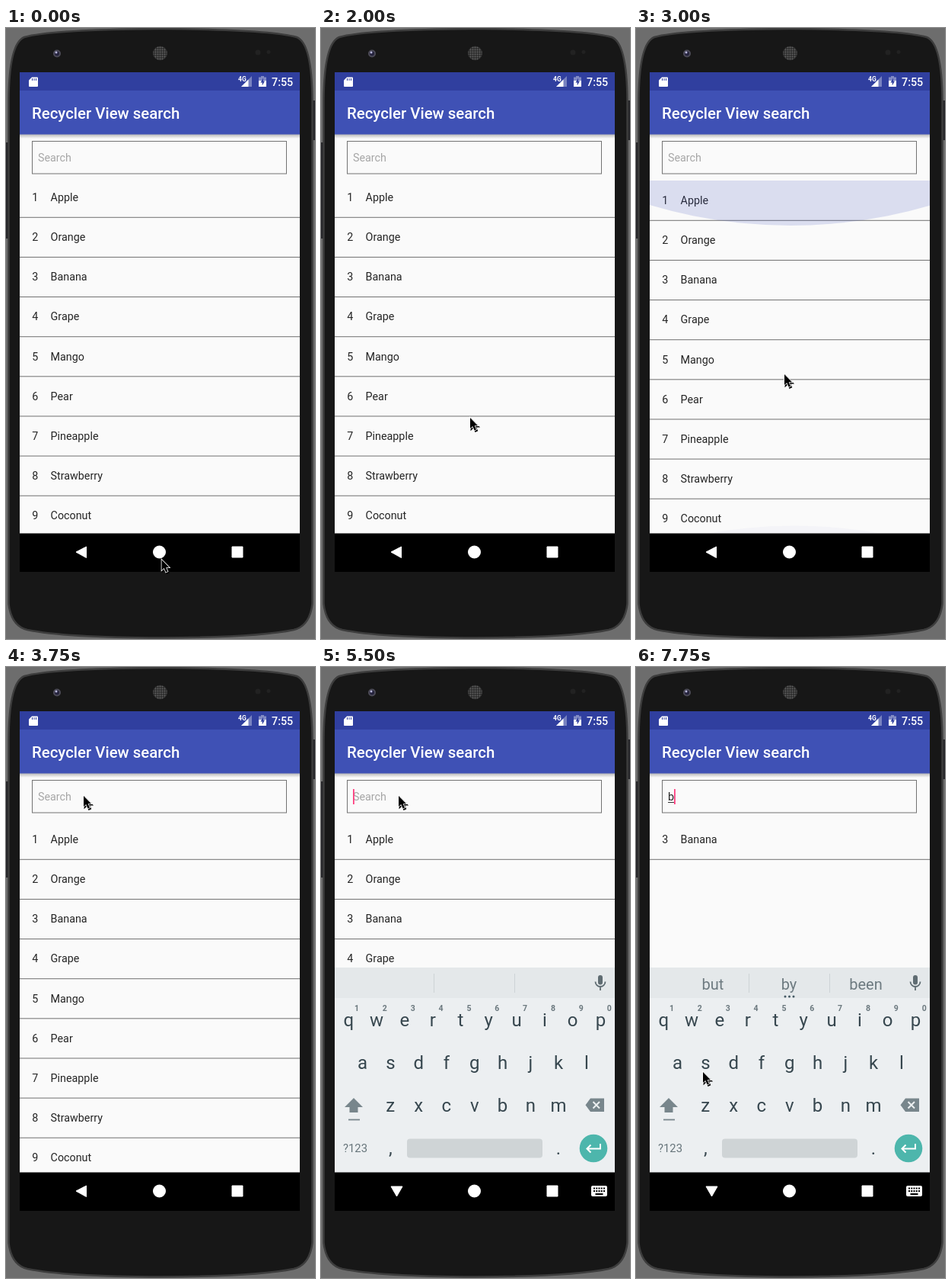
Recreate the animation shown at these times as an HTML page. Size 406x801 px, loop 8 s.

```html
<!DOCTYPE html>
<html lang="en">
<head>
<meta charset="utf-8">
<title>Recycler View search</title>
<style>
html, body { margin: 0; width: 100%; height: 100%; overflow: hidden; background: #6d6d6d; }
svg { display: block; width: 100%; height: 100%; font-family: Roboto, sans-serif; font-size: 14.3px; }
.row { fill: #252525; }
.key { font-size: 24px; fill: #37474f; text-anchor: middle; }
.hint { font-size: 10.5px; font-weight: 700; fill: #6b787e; text-anchor: middle; }
.suggest { font-size: 20px; fill: #6d7a80; text-anchor: middle; }
</style>
</head>
<body>
<svg viewBox="0 0 406 801">
  <defs>
    <clipPath id="listClip"><rect x="18" y="200" width="368" height="462.5"/></clipPath>
    <linearGradient id="shade" x2="0" y2="1">
      <stop stop-opacity=".28"/><stop offset="1" stop-opacity="0"/>
    </linearGradient>
    <pattern id="mesh" width="3" height="3" patternUnits="userSpaceOnUse">
      <rect width="3" height="3" fill="#2b2b2b"/><circle cx="1.5" cy="1.5" r="1" fill="#626262"/>
    </pattern>
    <path id="arrow" d="M0 0V14L3.2 11L5.6 16.5L8 15.4L5.7 10.2H10Z"/>
  </defs>

  <!-- handset -->
  <path d="M0 150h3v126h-3zM403 95h3v52h-3z" fill="#26262a"/>
  <path id="body" d="M3.5 95Q4 20 24 12Q60 2 203 1Q346 2 382 12Q402 20 402.5 95V755Q399 784 378 789Q330 799 203 799.5Q76 799 28 789Q7 784 3.5 755Z"
    fill="#171717" stroke="#3d3d3d" stroke-width="2.5"/>
  <circle cx="67" cy="33.500" r="5" fill="#4c4b57"/>
  <circle cx="67" cy="33.500" r="3" fill="#24223c"/>
  <circle cx="66" cy="32" r="1.500" fill="#b9b8dc"/>
  <circle cx="202.500" cy="33" r="9.300" fill="url(#mesh)"/>
  <circle cx="331" cy="32" r="3.500" fill="#222"/>
  <circle cx="345" cy="31.500" r="2.500" fill="#222"/>

  <!-- app -->
  <rect x="18" y="58" width="368" height="655" fill="#fafafa"/>
  <rect x="18" y="139" width="368" height="6" fill="url(#shade)"/>
  <rect x="18" y="58" width="368" height="25" fill="#303f9f"/>
  <rect x="18" y="82" width="368" height="57.500" fill="#3f51b5"/>
  <text x="34" y="119" font-size="20.4" font-weight="500" fill="#fff">Recycler View search</text>
  <g fill="#fff">
    <path d="M34 64.500H41Q42 64.500 42 65.500V76Q42 77 41 77H31Q30 77 30 76V68.500Z"/>
    <path d="M34.500 66v3M37 66v3M39.500 66v3" stroke="#303f9f"/>
    <text x="305" y="69.500" font-size="8.5" font-weight="700">4G</text>
    <path d="M323 63V77H309Z" fill-opacity=".35"/>
    <path d="M318.500 67.500V77H309Z"/>
    <path d="M335 63h4v1.500h3v12.500h-10v-12.500h3z" fill-opacity=".4"/>
    <path d="M332 69h10v8h-10z"/>
    <path d="M338 65.500L334.500 71.500H336.700V75.500L340 69.500H338Z" fill="#303f9f"/>
    <text x="349" y="75.500" font-weight="500">7:55</text>
  </g>
  <rect x="34.500" y="148.500" width="334" height="42.500" fill="none" stroke="#737373"/>
  <text id="query" x="42" y="175"></text>
  <path id="underline" d="M42 177.500h8" stroke="#333"/>
  <rect id="caret" y="160" width="1.800" height="20" fill="#ff4081"/>

  <g clip-path="url(#listClip)">
    <g id="list"></g>
    <circle id="topGlow" cx="203" r="650" fill="#3f51b5"/>
    <circle id="bottomGlow" cx="208" r="650" fill="#3f51b5"/>
  </g>

  <!-- keyboard -->
  <g id="keyboard">
    <rect x="18" y="394" width="368" height="269" fill="#eceff1"/>
    <rect x="18" y="394" width="368" height="40" fill="#e4e8ea"/>
    <path d="M148.500 402v25M254.500 402v25" stroke="#cdd3d6"/>
    <g id="keys">
      <rect x="364" y="404" width="6" height="12.500" rx="3" fill="#5f6c72"/>
      <path d="M360.500 412.500a6.500 6.500 0 0 0 13 0M367 419v5" fill="none" stroke="#5f6c72" stroke-width="1.800"/>
      <path d="M43 565L55 577H48.500V584H37.500V577H31Z" fill="#78868c"/>
      <path d="M36 593.500h15" stroke="#78868c" stroke-width="1.800"/>
      <path d="M354 565.500H372V583H354L347.500 574.200Z" fill="#78868c"/>
      <path d="M357.500 570l8.500 8.500m0-8.500l-8.500 8.500" stroke="#eceff1" stroke-width="2"/>
      <rect x="113" y="618.500" width="178" height="25" rx="4" fill="#cfd4d6"/>
      <text x="45" y="636" text-anchor="middle" font-size="14.8" fill="#66747a">?123</text>
      <circle cx="358" cy="631" r="18.300" fill="#4db6ac"/>
      <path d="M367 625v6.500H350M354.500 626.500l-5 5l5 5" fill="none" stroke="#fff" stroke-width="2"/>
    </g>
    <g id="suggestions">
      <text class="suggest" x="101" y="422.500">but</text>
      <text class="suggest" x="201" y="422.500">by</text>
      <text class="suggest" x="302" y="422.500">been</text>
      <path d="M196 432h0M201.500 432h0M207 432h0" stroke="#455a64" stroke-width="3" stroke-linecap="round"/>
    </g>
  </g>

  <!-- navigation bar -->
  <rect x="18" y="662.500" width="368" height="50.500" fill="#000"/>
  <g fill="#fff" stroke="#fff" stroke-linejoin="round">
    <path id="back" d="M92 687L105.500 680V694.500Z"/>
    <path id="hide" d="M92 681H107L99.500 694Z"/>
    <circle cx="201.500" cy="687" r="8"/>
    <rect x="297" y="680" width="14" height="14"/>
  </g>
  <g id="imeIcon">
    <rect x="355" y="680" width="21" height="14" rx="2" fill="#fff"/>
    <path d="M358 683.500h15M358 687h15" stroke="#000" stroke-width="2" stroke-dasharray="2 1.250"/>
    <path d="M360.500 691h10" stroke="#000" stroke-width="2"/>
  </g>

  <g id="cursor">
    <use href="#arrow" x="1.300" y="1.500" stroke="#000" stroke-width="1.500"/>
    <use href="#arrow" stroke="#fff" stroke-width="1.600"/>
    <use href="#arrow"/>
  </g>
</svg>
<script>
const DURATION = 8000, TICK = 250, ROW = 52.13, LIST_TOP = 200, LIST_END = 662.5, RADIUS = 650;
const fruits = ['Apple', 'Orange', 'Banana', 'Grape', 'Mango', 'Pear', 'Pineapple', 'Strawberry', 'Coconut', 'Almond'];
const $ = id => document.getElementById(id);

function add(parent, tag, attrs, text = '') {
  const el = document.createElementNS('http://www.w3.org/2000/svg', tag);
  for (const name in attrs) el.setAttribute(name, attrs[name]);
  el.textContent = text;
  return parent.appendChild(el);
}
const show = (id, on) => $(id).setAttribute('visibility', on ? 'visible' : 'hidden');

const rows = fruits.map((fruit, i) => {
  const row = add($('list'), 'g', { class: 'row' }), label = String(i + 1);
  add(row, 'text', { x: 34.2, y: 31 }, label);
  add(row, 'text', { x: 50.4 + 8.2 * label.length, y: 31 }, fruit);
  add(row, 'rect', { x: 18, y: 51.8, width: 368, height: 1, fill: '#707070' });
  return row;
});

const keyRows = [['qwertyuiop', 36.3, 471], ['asdfghjkl', 54.6, 527], ['zxcvbnm', 91.3, 583], [',', 91.3, 639], ['.', 312, 639]];
for (const [letters, x, y] of keyRows)
  [...letters].forEach((c, i) => add($('keys'), 'text', { class: 'key', x: x + 36.8 * i, y }, c));
[...'1234567890'].forEach((c, i) => add($('keys'), 'text', { class: 'hint', x: 47 + 36.85 * i, y: 451 }, c));

// Each track: [tick, ...values], linear between entries.
const cursorTrack = [[0, 204.5, 697], [1, 204.5, 697], [6, 208, 530], [8, 196, 511], [10, 228, 291], [12, 195, 454],
  [15, 102, 169], [25, 102, 169], [29, 237, 583], [30, 237, 583], [31, 88, 531]];
const topTrack = [[10, 0, 0], [12, 59, .17], [14, 0, 0]];
const bottomTrack = [[8, 0, 0], [10, 61.5, .26], [12, 10, .03], [13, 0, 0]];
const keyTrack = [[16, .5], [18, 1]];
const caretStarts = [2, 6, 10, 18, 22, 26, 30];

function sample(track, tick) {
  const next = track.findIndex(k => k[0] > tick);
  if (next < 0) return track[track.length - 1].slice(1);
  if (next === 0) return track[0].slice(1);
  const [a, b] = [track[next - 1], track[next]], p = (tick - a[0]) / (b[0] - a[0]);
  return a.slice(1).map((v, i) => v + (b[i + 1] - v) * p);
}

function glow(id, track, tick, centre) {
  const [height, alpha] = sample(track, tick);
  $(id).setAttribute('cy', centre(height));
  $(id).setAttribute('fill-opacity', alpha);
}

function draw(tick) {
  const typed = tick >= 30, keyboard = tick >= 16;
  const scroll = tick < 9 ? 4 : tick < 11 ? 58 : 0;
  rows.forEach((row, i) => {
    row.setAttribute('visibility', !typed || i === 2 ? 'visible' : 'hidden');
    row.setAttribute('transform', `translate(0 ${LIST_TOP + (typed ? 0 : i * ROW) - scroll})`);
  });
  glow('topGlow', topTrack, tick, h => LIST_TOP + h - RADIUS);
  glow('bottomGlow', bottomTrack, tick, h => LIST_END - h + RADIUS);

  $('query').textContent = typed ? 'b' : 'Search';
  $('query').setAttribute('fill', typed ? '#252525' : '#a6a6a6');
  show('underline', typed);
  $('caret').setAttribute('x', typed ? 50 : 42);
  show('caret', caretStarts.some(s => tick >= s && tick < s + 2));

  show('keyboard', keyboard);
  $('keys').setAttribute('opacity', sample(keyTrack, tick)[0]);
  show('suggestions', tick >= 31);
  show('back', !keyboard);
  show('hide', keyboard);
  show('imeIcon', keyboard);
  $('cursor').setAttribute('transform', `translate(${sample(cursorTrack, tick).join(' ')})`);
}

const start = performance.now();
let lastTick = -1;
function frame() {
  const tick = Math.floor((performance.now() - start) % DURATION / TICK);
  if (tick !== lastTick) draw(lastTick = tick);
  requestAnimationFrame(frame);
}
frame();
</script>
</body>
</html>
```
